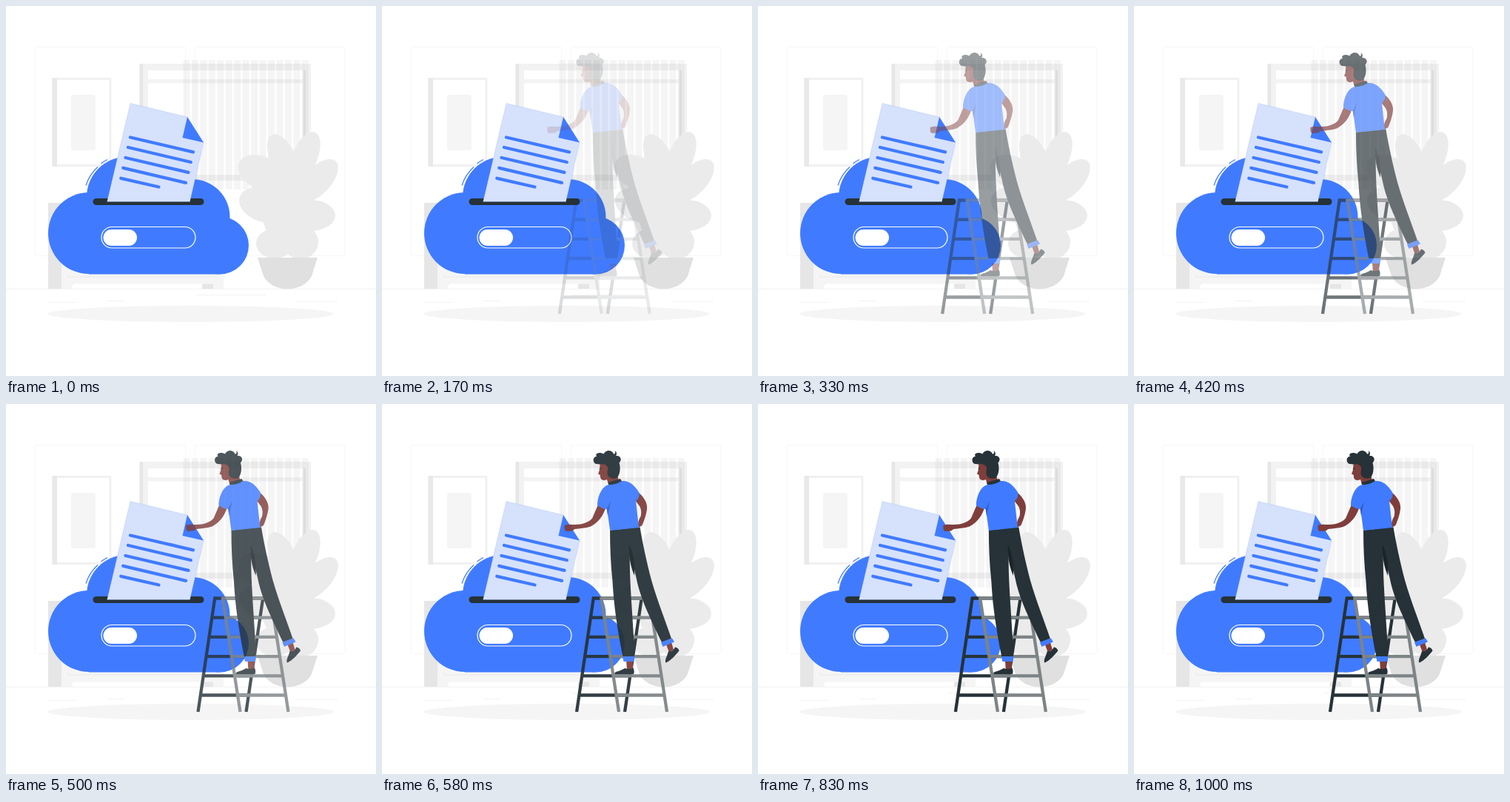
An HTML page that plays this animation: 500x500 px, repeating every 1.04 s.

```html
<!DOCTYPE html>
<html lang="en">
<head>
<meta charset="utf-8">
<title>Cloud upload</title>
<style>
  html, body { margin: 0; width: 100%; height: 100%; overflow: hidden; background: #fff; }
  svg { display: block; width: 100vw; height: 100vh; }
</style>
</head>
<body>
<svg viewBox="0 0 500 500">
  <!-- room -->
  <g fill="none" stroke="#f5f5f5" stroke-width=".8">
    <rect x="39.5" y="55.5" width="203" height="282" rx="2"/>
    <rect x="255" y="55.5" width="203" height="282" rx="2"/>
  </g>
  <path d="M0 382.5H500" stroke="#ebebeb" stroke-width=".6"/>
  <path d="M57 400.5H95M136 398.5H160M256 390.5H352M392 399.5H448" stroke="#f0f0f0" stroke-width=".7"/>

  <g id="picture">
    <rect x="62.5" y="97" width="80" height="120" fill="#f1f1f1"/>
    <rect x="62.5" y="97" width="6.5" height="120" fill="#e9e9e9"/>
    <rect x="69" y="100" width="70.5" height="114" fill="#fff"/>
    <rect x="88" y="120" width="33" height="75" rx="3" fill="#f5f5f5"/>
  </g>

  <g id="window">
    <path d="M184 78H412V236H184ZM192 87V228H402V87Z" fill="#f2f2f2" fill-rule="evenodd"/>
    <path d="M180.500 78H185V236H180.500ZM401.500 87H405V228H401.500Z" fill="#e6e6e6"/>
    <rect x="192" y="99" width="210" height="5.500" fill="#f4f4f4"/>
    <g id="blinds" fill="#000" fill-opacity=".04"/>
  </g>

  <g id="cabinet">
    <path d="M75 266H294V382H280L275 375.500H91L88 382H75Z" fill="#f5f5f5"/>
    <path d="M84 362V366H284V362" fill="none" stroke="#e8e8e8" stroke-width=".8"/>
    <path d="M57 266H75V382H57ZM265 375.500H280V382H265Z" fill="#e6e6e6"/>
  </g>

  <g id="plant" fill="#ebebeb">
    <ellipse cx="380" cy="266" rx="36" ry="60"/>
    <ellipse cx="374" cy="205" rx="17" ry="34" transform="rotate(-25 374 205)"/>
    <ellipse cx="404" cy="204" rx="17" ry="36" transform="rotate(22 404 204)"/>
    <ellipse cx="421" cy="236" rx="18" ry="36" transform="rotate(43 421 236)"/>
    <ellipse cx="411" cy="283" rx="34" ry="21"/>
    <ellipse cx="344" cy="225" rx="22" ry="32" transform="rotate(-65 344 225)"/>
    <ellipse cx="349" cy="269" rx="23" ry="35" transform="rotate(-72 349 269)"/>
    <ellipse cx="363" cy="321" rx="25" ry="20"/>
    <ellipse cx="398" cy="319" rx="24" ry="23"/>
    <path d="M340 340H421L413 365C407 376 395 382.500 380.500 382.500C366 382.500 354 376 348 365Z" fill="#e0e0e0"/>
  </g>

  <ellipse cx="249.500" cy="416" rx="193.500" ry="11" fill="#f5f5f5"/>

  <g id="cloud" fill="#407bff">
    <circle cx="112" cy="307" r="55"/>
    <circle cx="163" cy="258" r="54"/>
    <circle cx="251.500" cy="285" r="51"/>
    <circle cx="289" cy="323.500" r="39"/>
    <path d="M112 262H250V285H289V362.500H112Z"/>
    <path d="M108 242.500A57 57 0 0 1 124 217.500M128.500 213A57 57 0 0 1 137 207.500" fill="none" stroke="#407bff" stroke-width="1.200"/>
    <rect x="129" y="298.500" width="127" height="28.500" rx="14.250" fill="none" stroke="#fff" stroke-width="1.200"/>
    <rect x="131.500" y="302" width="45.500" height="22" rx="11" fill="#fff"/>
    <rect x="117.500" y="260" width="150" height="9" rx="4.500" fill="#263238"/>
  </g>

  <g id="paper">
    <path d="M168 131.500L245 150L267 184.500L248.500 264.500H136.500Z" fill="#d6e1fb" stroke="#407bff" stroke-opacity=".3" stroke-width=".5"/>
    <path d="M245 150L267 184.500L238.500 178Z" fill="#407bff"/>
    <path d="M168 177.500L253 197.300M165 191L249.800 211M161.500 205L246.500 224.800M158.300 218.800L243 238.800M155.300 232.800L206.500 244.500" stroke="#407bff" stroke-width="4.300" stroke-linecap="round"/>
  </g>

  <g id="worker" opacity="0">
    <g id="ladder" fill="none" stroke-width="4.300"/>

    <!-- shoes, ankles, cuffs -->
    <g fill="#7f3e3b">
      <path d="M332 346H341V360H333Z"/>
      <path d="M386 325L393 322L396 332L390 336Z"/>
    </g>
    <path d="M316 364C317 361 325 361 330 357C334 359 338 358 341.500 356.500C343 360 343 363 342 365L317 365Z" fill="#263238"/>
    <path d="M385 349C384 345 388 339 389 334C393 335 396 333 398 328.500C401 329 403 331 403.500 333.500C398 340 393 346 386 349.500Z" fill="#263238"/>

    <!-- trousers -->
    <path d="M330 168L350.500 166.500C354 188 360 215 366 238C374 266 385 293 393 317L380 322C367 295 351 263 346 237Z" fill="#263238"/>
    <path d="M310 170.500L345 167L337 194C336 220 338 250 339.500 275C341 300 343 325 343 342L327.500 342C320 306 315 270 313.500 240C311 216 310 193 310 170.500Z" fill="#263238"/>
    <path d="M336 190C342 203 344 218 343 232C338 220 335 206 336 190Z" fill="#1a2429"/>
    <g fill="#407bff">
      <path d="M327 341H343.500L342.500 348H328.500Z"/>
      <path d="M379 322L394 316.500L397 321.500L381.500 328Z"/>
    </g>

    <!-- arms -->
    <g fill="#7f3e3b">
      <path d="M304.500 139C301 152 293 161 284 165.500C277 168 269 168 262.500 169L259 171.500L251 172C248 171 248.500 167 248.500 164C253 162 258 163 263 163C273 163 281 160 286 154.500L294 136Z"/>
      <path d="M349 120C356 126 361 134 360 142C359 150 356 158 353.500 164L348.500 167C347 161 349 156 351.500 152C353 146 352 142 350 138L343 129Z"/>
    </g>

    <!-- head and shirt -->
    <path d="M296.500 80L296 89L294 94.500L296.800 96C296.500 102 300 104.500 306 102L308 109L322 105L318 82Z" fill="#7f3e3b"/>
    <path d="M295.500 88L299 86.500" stroke="#263238" stroke-width="1"/>
    <path d="M290 80.500C285.500 77 288 70.500 292 71C288.500 66 297 64.500 301.500 67.500C304 61.500 313 61.500 315 67.500C317.500 67.500 317.500 65 316.500 63C319.500 65 319.500 68 318 70C324 69 327 75 322.500 79.500C325 87 323 97 319 100C315 102 309 100 307.500 97C304.500 92 309 87 306 84C302 79 296 83 290 80.500Z" fill="#263238"/>
    <path d="M307.500 106L324 101L327 106L309 111.500Z" fill="#263238"/>
    <path d="M309 109C300 110 293 124 293 137C297 140 302 142 306 142L310 171L349 167L345 131C349 128 350.500 123 349 119C342 108 335 103 326 104C322 107 315 109 309 109Z" fill="#407bff"/>
    <path d="M311 131C309 136 307 139 305.500 141.500L307 151C308 145 310 138 311 131Z" fill="#2f5fcc"/>
  </g>
</svg>

<script>
const $ = id => document.getElementById(id);

function add(parent, tag, attrs) {
  const el = document.createElementNS("http://www.w3.org/2000/svg", tag);
  for (const key in attrs) el.setAttribute(key, attrs[key]);
  parent.append(el);
}

for (let i = 0; i < 15; i++) {
  add($("blinds"), "rect", { x: 239.5 + i * 11.45, y: 73, width: 9, height: 175 });
}

// One side of the ladder: two rails leaning by `lean`, joined by six rungs.
function ladderSide(topX, lean, color) {
  const top = 260.5, foot = 416, width = 65;
  let d = "";
  for (const x of [topX, topX + width]) d += `M${x} ${top}L${x + lean} ${foot}`;
  for (let i = 0; i < 6; i++) {
    const y = 262.5 + i * 26.2;
    d += `M${topX + lean * (y - top) / (foot - top)} ${y}h${width}`;
  }
  add($("ladder"), "path", { d, stroke: color });
}
ladderSide(288, -23, "#263238");
ladderSide(298, 24, "#7d8486");

const bez = (s, a, b) => 3 * (1 - s) ** 2 * s * a + 3 * (1 - s) * s * s * b + s ** 3;

// cubic-bezier(.36, -.01, .5, 1.38): overshoots, then settles
function ease(x) {
  let lo = 0, hi = 1;
  for (let i = 0; i < 30; i++) {
    const mid = (lo + hi) / 2;
    if (bez(mid, 0.36, 0.5) < x) lo = mid; else hi = mid;
  }
  return bez(lo, -0.01, 1.38);
}

const LOOP = 1040, STEPS = 25, FPS = 24, SLIDE = 30;
const stepStart = k => Math.round(k * 100 / FPS) * 10;

function draw(now) {
  const t = now % LOOP;
  let k = STEPS - 1;
  while (stepStart(k) > t) k--;
  const p = k < 2 ? 0 : ease(Math.min(1, (stepStart(k) + 40) / 1000));
  $("worker").setAttribute("opacity", Math.min(1, Math.max(0, p)));
  $("worker").setAttribute("transform", `translate(${(p - 1) * SLIDE} 0)`);
}

const begin = performance.now();
function tick() {
  draw(performance.now() - begin);
  requestAnimationFrame(tick);
}
tick();
</script>
</body>
</html>
```
